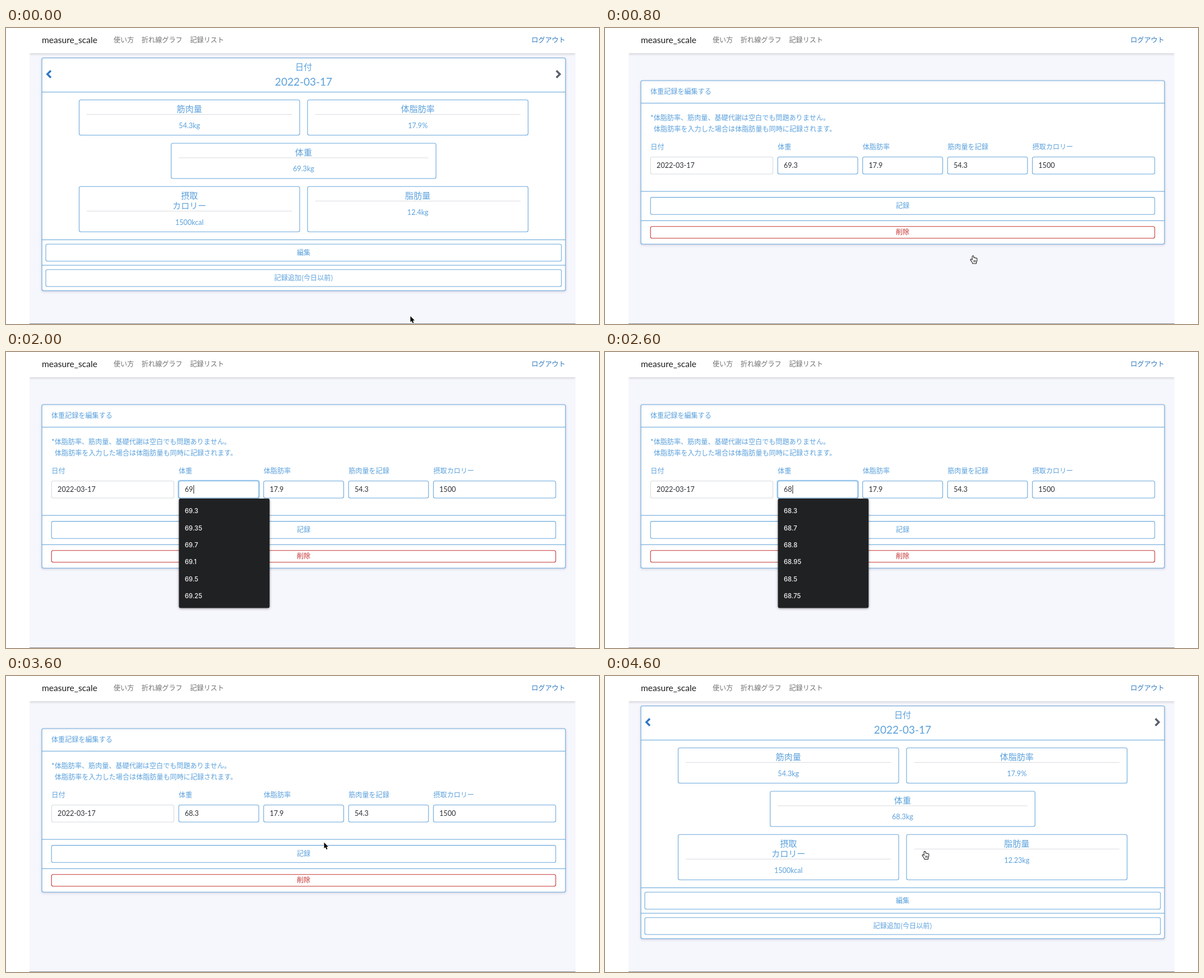
An HTML page with a canvas that plays this animation: 1058 px wide and 529 px high, repeating every 4.8 s.

```html
<!DOCTYPE html>
<html lang="ja">
<head>
<meta charset="utf-8">
<title>体重記録</title>
<style>
html, body { margin: 0; width: 100%; height: 100%; overflow: hidden; background: #fff; }
canvas { display: block; width: 1058px; height: 529px; }
</style>
</head>
<body>
<canvas id="stage"></canvas>
<script>
const W = 1058, H = 529, LOOP = 4800, STEP = 200;
const canvas = document.getElementById('stage');
const ctx = canvas.getContext('2d');
const ratio = window.devicePixelRatio || 1;
canvas.width = W * ratio;
canvas.height = H * ratio;

const BORDER = '#6ba8db', BLUE = '#5ba1dc', FILL = '#5ea2e8', RING = '#b7d9f4';
const INK = '#2d3035', DARK = '#202123', RED = '#c43432', LINK = '#2f79bd';
const JP = '"Noto Sans CJK JP", "Noto Sans CJK", sans-serif';
const LATIN = 'Lato, ' + JP;
const UI = 'Inter, sans-serif';

function text(str, x, y, { size = 12.1, font = JP, color = BLUE, align = 'left', weight = 400 } = {}) {
  ctx.font = `${weight} ${size}px ${font}`;
  ctx.fillStyle = color;
  ctx.textAlign = align;
  ctx.fillText(str, x, y);
}

function box(x1, y1, x2, y2, { stroke = BORDER, fill = '#fff', r = 3, line = 1.1 } = {}) {
  ctx.beginPath();
  ctx.roundRect(x1, y1, x2 - x1, y2 - y1, r);
  if (fill) { ctx.fillStyle = fill; ctx.fill(); }
  if (stroke) { ctx.strokeStyle = stroke; ctx.lineWidth = line; ctx.stroke(); }
}

function rule(x1, x2, y, color = BORDER, line = 1.1) {
  ctx.fillStyle = color;
  ctx.fillRect(x1, y - line / 2, x2 - x1, line);
}

function withShadow(color, blur, dy, draw) {
  ctx.save();
  ctx.shadowColor = color;
  ctx.shadowBlur = blur * ratio;
  ctx.shadowOffsetY = dy * ratio;
  draw();
  ctx.restore();
}

function card(top, bottom, rules) {
  withShadow('rgba(60,70,100,.16)', 4, 1.5, () => box(64, top, 998.3, bottom));
  rules.forEach(y => rule(64, 998, y));
}

function button(label, x1, y1, x2, y2, { state = '', color = BLUE, stroke = BORDER } = {}) {
  if (state === 'focus') box(x1 - 2, y1 - 2, x2 + 2, y2 + 2, { fill: RING, stroke: null, r: 4.5 });
  box(x1, y1, x2, y2, state ? { fill: FILL, stroke: FILL } : { stroke });
  text(label, 531, (y1 + y2) / 2 + 4, { align: 'center', color: state ? '#212529' : color });
}

function chevron(x, dir, color) {
  ctx.beginPath();
  ctx.moveTo(x - 3 * dir, 76.2);
  ctx.lineTo(x + 3.2 * dir, 82.5);
  ctx.lineTo(x - 3 * dir, 88.8);
  ctx.strokeStyle = color;
  ctx.lineWidth = 3.4;
  ctx.lineJoin = 'miter';
  ctx.stroke();
}

function frame() {
  ctx.fillStyle = '#fff';
  ctx.fillRect(0, 0, W, H);
  ctx.fillStyle = '#f6f6fd';
  ctx.fillRect(42, 0, 974, H);
  ctx.save();
  ctx.beginPath();
  ctx.rect(42, 0, 974, H);
  ctx.clip();
  withShadow('rgba(0,0,0,.14)', 4, 1.5, () => {
    ctx.fillStyle = '#fff';
    ctx.fillRect(42, -10, 974, 55);
  });
  ctx.restore();
  rule(42, 1016, 528.5, '#8b8b90', 1);
  text('measure_scale', 64, 27, { size: 15.6, font: LATIN, color: '#1c1c1c' });
  const nav = { color: '#707070' };
  text('使い方', 192, 26, nav);
  text('折れ線グラフ', 242, 26, nav);
  text('記録リスト', 328.5, 26, nav);
  text('ログアウト', 998, 26, { color: LINK, align: 'right' });
}

function metric(title, value, x1, y1, x2, y2) {
  const mid = (x1 + x2) / 2, extra = (title.length - 1) * 18;
  box(x1, y1, x2, y2);
  title.forEach((part, i) =>
    text(part, mid, y1 + 21.5 + i * 18, { size: 15.1, align: 'center' }));
  rule(x1 + 13.5, x2 - 13.5, y1 + 26 + extra, '#dadce0', 1);
  text(value, mid, y1 + 50.3 + extra, { size: 12.6, font: LATIN, align: 'center' });
}

function dayPage({ weight, fat, edit }) {
  card(53.5, 469.5, [114.5, 378.5, 424]);
  text('日付', 531, 74.5, { size: 15.1, align: 'center' });
  text('2022-03-17', 531, 102.7, { size: 19, font: LATIN, align: 'center' });
  chevron(77, -1, '#2f78c6');
  chevron(985, 1, '#59616b');
  metric(['筋肉量'], '54.3kg', 130.5, 128.5, 524, 191.5);
  metric(['体脂肪率'], '17.9%', 538, 128.5, 931.5, 191.5);
  metric(['体重'], weight, 294.7, 206, 767.2, 269);
  metric(['摂取', 'カロリー'], '1500kcal', 130.5, 283.2, 524, 364.3);
  metric(['脂肪量'], fat, 538, 283.2, 931.5, 364.3);
  button('編集', 71, 386.3, 991, 416.7, { state: edit });
  button('記録追加(今日以前)', 71, 431.7, 991, 462);
}

function field(label, value, x1, x2, { focus, caret, stroke = BORDER } = {}) {
  text(label, x1, 217);
  if (focus) box(x1 - 2, 228.5, x2 + 2, 263, { fill: RING, stroke: null, r: 4.5 });
  box(x1, 230.5, x2, 261, { stroke });
  text(value, x1 + 10.8, 249.6, { size: 12.6, font: LATIN, color: INK });
  if (caret) {
    const end = x1 + 11.6 + ctx.measureText(value).width;
    ctx.fillStyle = '#111';
    ctx.fillRect(end, 238, 1, 15);
  }
}

function suggestions(items) {
  withShadow('rgba(0,0,0,.4)', 4, 1, () =>
    box(308.5, 262, 470.3, 275.4 + 30.35 * items.length, { fill: DARK, stroke: null }));
  items.forEach((item, i) =>
    text(item, 319, 288.2 + 30.35 * i, { size: 11.3, font: UI, weight: 500, color: '#f3f3f3' }));
}

function editPage({ value = '69.3', focus, caret, list, save }) {
  card(94, 386.2, [134.3, 292, 344.3]);
  text('体重記録を編集する', 81, 118);
  text('*体脂肪率、筋肉量、基礎代謝は空白でも問題ありません。', 81, 165);
  text('体脂肪率を入力した場合は体脂肪量も同時に記録されます。', 87, 184.5);
  field('日付', '2022-03-17', 81.3, 299.6, { stroke: '#d6dadf' });
  field('体重', value, 308.2, 451, { focus, caret });
  field('体脂肪率', '17.9', 459.7, 602.5);
  field('筋肉量を記録', '54.3', 611.2, 753.8);
  field('摂取カロリー', '1500', 762.5, 980.8);
  button('記録', 81.2, 302.6, 980.8, 333.3, { state: save });
  button('削除', 81.2, 354.8, 980.8, 375.8, { color: RED, stroke: RED });
  if (list) suggestions(list);
}

function outline(path, x, y, fill, stroke, line) {
  ctx.save();
  ctx.translate(x, y);
  ctx.lineJoin = 'round';
  ctx.strokeStyle = stroke;
  ctx.lineWidth = line;
  ctx.stroke(path);
  ctx.fillStyle = fill;
  ctx.fill(path);
  ctx.restore();
}

const arrowPath = new Path2D('M0 0V10.6L2.4 8.4L4.2 12.5L6 11.7L4.3 7.8H7.6Z');
const handPath = new Path2D('M3.2 8.2L1 6.5Q-.4 6.2 .2 7.6L3.6 12.4V13.6H9.6V12L10.8 8.4V5.2Q10.3 4.1 9.2 4.9Q8.6 3.7 7.2 4.4Q6.4 3.4 5 4V1.2Q4.1 -.4 3.1 1.2Z');
const cursors = {
  arrow: (x, y) => outline(arrowPath, x, y, '#000', '#fff', 1.8),
  hand(x, y) {
    outline(handPath, x, y, '#fff', '#111', 2);
    ctx.fillStyle = '#111';
    [5, 6.7, 8.4].forEach(dx => ctx.fillRect(x + dx, y + 8, .8, 3.4));
  },
  beam(x, y) {
    const path = new Path2D('M-2.8 -6.5Q0 -6.5 0 -5V5Q0 6.5 -2.8 6.5M2.8 -6.5Q0 -6.5 0 -5M0 5Q0 6.5 2.8 6.5M-1.5 1.8H1.5');
    ctx.save();
    ctx.translate(x, y);
    ctx.strokeStyle = '#fff';
    ctx.lineWidth = 2.4;
    ctx.stroke(path);
    ctx.strokeStyle = '#111';
    ctx.lineWidth = 1.1;
    ctx.stroke(path);
    ctx.restore();
  }
};

const series = (base, tails) => tails.split(' ').map(t => base + t);
const sixty8 = series('68', '.3 .7 .8 .95 .5 .75');
const sixty9 = series('69', '.3 .35 .7 .1 .5 .25');
const mixed = ['69.3', '68.3', '68.7', '69.35', '68.8', '68.95'];

const before = { weight: '69.3kg', fat: '12.4kg' };
const after = { weight: '68.3kg', fat: '12.23kg' };
const typing = (value, list, caret = true) => ({ value, list, caret, focus: true });
const typed = typing('68.3', ['68.3', '68.35']);
const done = { value: '68.3' };

// Each entry: start time, page, its state, cursor [kind, x, y].
const scenes = [
  [0, dayPage, before, ['arrow', 721.5, 515]],
  [200, dayPage, before, ['arrow', 684, 464]],
  [400, dayPage, { ...before, edit: 'hover', status: true }, ['hand', 652.5, 407]],
  [600, dayPage, { ...before, edit: 'focus', status: true }, ['hand', 652.5, 407]],
  [800, editPage, {}, ['hand', 652.5, 407]],
  [1000, editPage, {}, ['arrow', 508, 278]],
  [1200, editPage, {}, ['beam', 401, 247]],
  [1400, editPage, typing('69.3', ['69.3', '69.35'], false), ['beam', 401, 247]],
  [1800, editPage, typing('69.', sixty9)],
  [2000, editPage, typing('69', sixty9)],
  [2200, editPage, typing('6', mixed)],
  [2400, editPage, typing('68', sixty8)],
  [2800, editPage, typed],
  [3200, editPage, { ...typed, caret: false }, ['arrow', 500, 283]],
  [3400, editPage, done, ['arrow', 512, 288]],
  [3600, editPage, done, ['arrow', 567.5, 297.5]],
  [3800, editPage, { ...done, save: 'hover' }, ['hand', 566.5, 313.3]],
  [4200, editPage, { ...done, save: 'focus' }, ['hand', 566.5, 313.3]],
  [4400, dayPage, after, ['hand', 566.5, 313.3]]
];

function render(time) {
  const t = Math.floor((time % LOOP) / STEP) * STEP;
  const [, page, state, cursor] = scenes.filter(s => s[0] <= t).pop();
  ctx.setTransform(ratio, 0, 0, ratio, 0, 0);
  ctx.textBaseline = 'alphabetic';
  frame();
  page(state);
  if (state.status) box(42, 525, 203, 535, { fill: DARK, stroke: null, r: [0, 3, 0, 0] });
  if (cursor) cursors[cursor[0]](cursor[1], cursor[2]);
}

const start = performance.now();
function tick() {
  render(performance.now() - start);
  requestAnimationFrame(tick);
}
tick();
</script>
</body>
</html>
```
